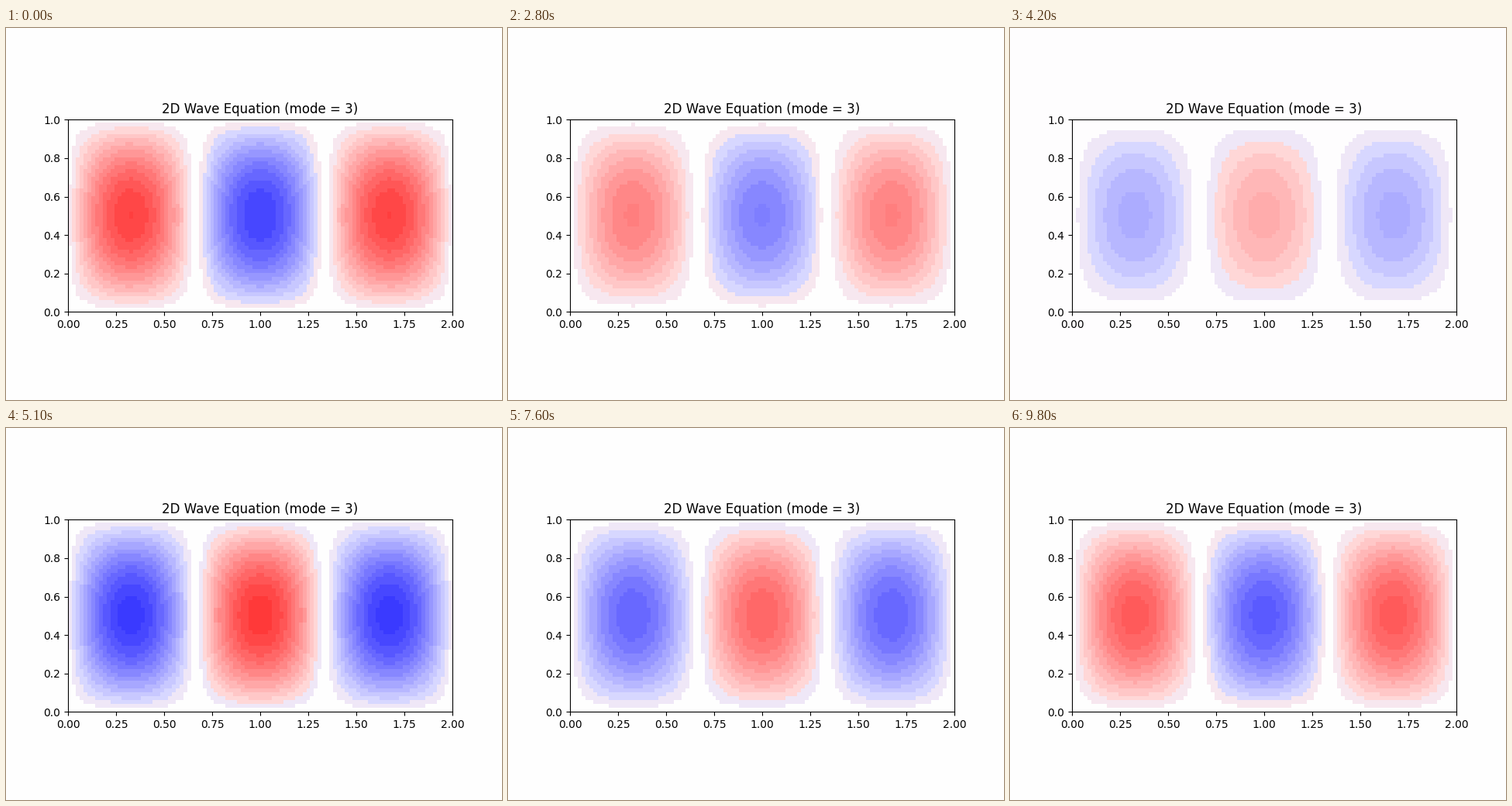
Recreate the animation shown at these times as a matplotlib script. Size 640 px wide and 480 px high, loop 9.9 s.

```python
import numpy as np
import matplotlib.pyplot as plt
from matplotlib.animation import FuncAnimation

NX, NY, MODE = 100, 50, 3
WIDTH, HEIGHT, DPI = 640, 480, 100
FRAMES, PERIOD, CREST = 99, 100, 11.5
BAND = 8  # colormap steps per colour band

# Standing wave on the interior nodes of a 2 x 1 membrane
x = np.arange(1, NX + 1) / (NX + 1)
y = np.arange(1, NY + 1) / (NY + 1)
shape = np.outer(np.sin(np.pi * y), np.sin(MODE * np.pi * x))
shape /= np.abs(shape).max()

cmap = plt.get_cmap("bwr")


def banded(u):
    """Return the posterised picture and the paper colour as 0-255 values."""
    step = np.clip(np.floor((u + 1) * 128), 0, 255).astype(int)
    level = np.where(step >= 128, step - 128, 127 - step) // BAND
    # The palest bands share one colour for both signs
    key = np.where((level >= 2) & (u < 0), -level, level)
    rgb = cmap(step, bytes=True)[..., :3].astype(float)

    picture = np.zeros_like(rgb)
    for k in np.unique(key):
        mask = key == k
        picture[mask] = rgb[mask].mean(axis=0)

    # Near-zero cells blend with the white page around the plot
    calm = key == 0
    area = 496 * 248
    cell = area / (NX * NY)
    page = WIDTH * HEIGHT - area
    total = rgb[calm].sum(axis=0) * cell + 255 * page
    paper = np.floor(total / (calm.sum() * cell + page))
    picture[calm] = paper
    return np.round(picture).astype(np.uint8), paper


fig, ax = plt.subplots(figsize=(WIDTH / DPI, HEIGHT / DPI), dpi=DPI)
image = ax.imshow(np.full((NY, NX, 3), 255, np.uint8), extent=[0, 2, 0, 1],
                  origin="lower", interpolation="nearest")
ax.set_title(f"2D Wave Equation (mode = {MODE})")


def update(n):
    swing = np.cos(2 * np.pi * (n - CREST) / PERIOD)
    picture, paper = banded(shape * swing)
    image.set_data(picture)
    fig.set_facecolor(paper / 255)
    ax.set_facecolor(paper / 255)
    return (image,)


anim = FuncAnimation(fig, update, frames=FRAMES, interval=100,
                     repeat=True, repeat_delay=0, blit=False)
plt.show()
```
